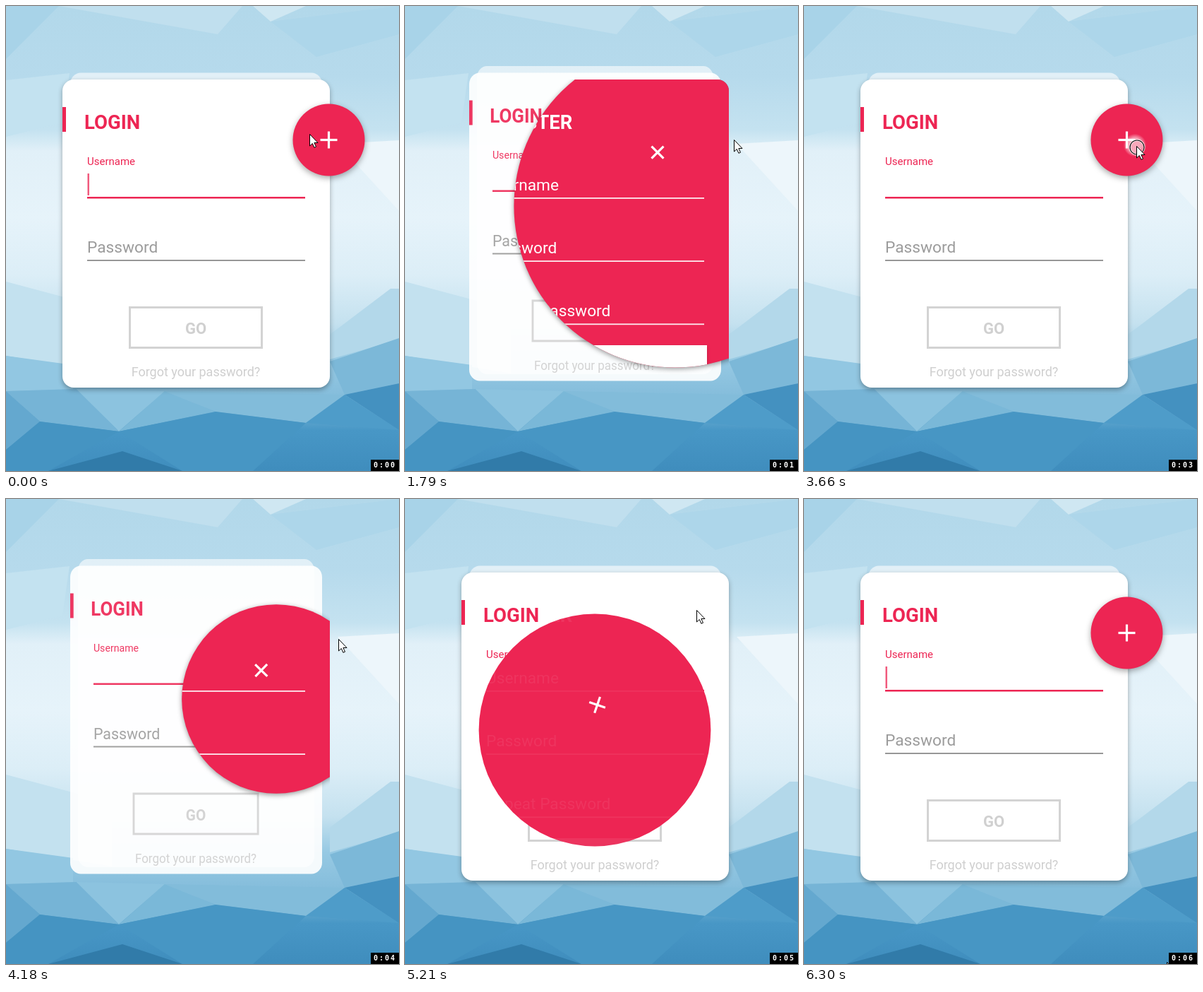
Recreate the animation shown at these times as an HTML page with a canvas. Size 557 by 658 pixels, loop 6.4 s.

```html
<!DOCTYPE html>
<html lang="en">
<head>
<meta charset="utf-8">
<title>Login and register</title>
<style>
html, body { margin: 0; width: 100%; height: 100%; overflow: hidden; background: #b2d8ea; }
canvas { display: block; width: 557px; height: 658px; }
</style>
</head>
<body>
<canvas id="stage" width="557" height="658"></canvas>
<script>
const W = 557, H = 658, LOOP = 6400;
const RED = '#ed2553';
const OPENS = [1290, 3770], CLOSES = [2604, 4899];
const MOVE = 250, REVEAL = 500, SHRINK = 600, BACK = 145;
const FAB = [457.5, 189.5], FAB_R = 51;
const SPOT = [383, 283], MID = [269, 327], CROSS = [408.5, 172.5];
const CARD = { x: 80, y: 104, w: 379, r: 16 };

const canvas = document.getElementById('stage');
const ctx = canvas.getContext('2d');

const clamp = v => Math.min(1, Math.max(0, v));
const lerp = (a, b, p) => a + (b - a) * p;
const ease = p => (1 - Math.cos(Math.PI * clamp(p))) / 2;
const decel = p => 1 - (1 - clamp(p)) ** 2;
const quad = (a, b, c, p) =>
  [0, 1].map(i => (1 - p) ** 2 * a[i] + 2 * p * (1 - p) * b[i] + p * p * c[i]);

// Low-poly backdrop
const FACETS = [
  ['#c3e1ef', 0, 390, 150, 430, 150, 520, 0, 495],
  ['#92c7e2', 0, 495, 95, 508, 95, 542, 0, 545],
  ['#b3d8ea', 545, 400, 557, 400, 557, 472, 459, 500, 459, 465],
  ['#7cb8d8', 459, 503, 557, 470, 557, 534, 480, 550],
  ['#76b4d6', 0, 545, 100, 542, 160, 602, 48, 588],
  ['#8cc3df', 100, 542, 225, 545, 160, 602],
  ['#7ab8d8', 225, 545, 297, 574, 160, 602],
  ['#82bcda', 225, 545, 480, 550, 425, 590, 297, 574],
  ['#64a8cf', 0, 545, 48, 588, 0, 628],
  ['#4594c2', 0, 628, 48, 588, 160, 602, 60, 658, 0, 658],
  ['#317ba9', 60, 658, 165, 630, 250, 658],
  ['#4796c4', 160, 602, 297, 574, 425, 590, 350, 658, 250, 658],
  ['#4491c0', 480, 550, 557, 534, 557, 600],
  ['#4e9cc9', 425, 590, 480, 550, 557, 600],
  ['#a8d3e8', 0, 0, 75, 0, 0, 75],
  ['#c0dfee', 75, 0, 335, 0, 300, 40],
  ['#cfe7f2', 350, 0, 425, 0, 375, 22],
  ['#add6ea', 375, 22, 557, 0, 557, 40, 440, 72],
  ['#c3e2f0', 0, 105, 90, 95, 80, 165, 0, 185],
  ['#edf6fb', 470, 195, 557, 190, 557, 290]
];
const SKY = [
  [0, '#b2d8ea'], [100, '#b6daec'], [175, '#c4e2f0'], [205, '#e1f0f8'], [300, '#e6f3fa'],
  [380, '#dceef7'], [450, '#c4e1ef'], [500, '#96c9e3'], [560, '#82bbda'], [600, '#4897c6'], [658, '#3f8dbd']
];

function makeBackdrop() {
  const layer = document.createElement('canvas');
  layer.width = W;
  layer.height = H;
  const g = layer.getContext('2d');
  const sky = g.createLinearGradient(0, 0, 0, H);
  SKY.forEach(([y, color]) => sky.addColorStop(y / H, color));
  g.fillStyle = sky;
  g.fillRect(0, 0, W, H);
  for (const [color, ...pts] of FACETS) {
    g.beginPath();
    for (let i = 0; i < pts.length; i += 2) g.lineTo(pts[i], pts[i + 1]);
    g.fillStyle = color;
    g.fill();
  }
  return layer;
}
const backdrop = makeBackdrop();

function shadow(alpha, blur, dy) {
  ctx.shadowColor = `rgba(0,0,0,${alpha})`;
  ctx.shadowBlur = blur;
  ctx.shadowOffsetY = dy;
}

function noShadow() {
  ctx.shadowColor = 'transparent';
}

function rect(x, y, w, h, color) {
  ctx.fillStyle = color;
  ctx.fillRect(x, y, w, h);
}

function disc([x, y], r, color) {
  ctx.beginPath();
  ctx.arc(x, y, r, 0, 2 * Math.PI);
  ctx.fillStyle = color;
  ctx.fill();
}

function cardPath(h) {
  ctx.beginPath();
  ctx.roundRect(CARD.x, CARD.y, CARD.w, h, CARD.r);
}

function text(str, x, y, size, color, weight = 400, align = 'left') {
  ctx.font = `${weight} ${size}px Roboto, sans-serif`;
  ctx.textAlign = align;
  ctx.fillStyle = color;
  ctx.fillText(str, x, y);
}

// One step back in the stack narrows a card and lifts it.
function pushBack(steps) {
  const cx = 269.5;
  ctx.translate(cx, -9.5 * steps);
  ctx.scale(1 - 0.058 * steps, 1);
  ctx.translate(-cx, 0);
}

function drawLogin(k, caret) {
  ctx.save();
  pushBack(1 + k);
  cardPath(436);
  ctx.fillStyle = 'rgba(255,255,255,0.6)';
  ctx.fill();
  ctx.restore();

  ctx.save();
  pushBack(k);
  ctx.globalAlpha = 1 - 0.09 * k;
  shadow(0.32 * (1 - k), 7, 3);
  cardPath(436);
  ctx.fillStyle = '#fff';
  ctx.fill();
  noShadow();
  rect(80, 143, 5, 35, RED);
  text('LOGIN', 111, 174, 27.5, RED, 700);
  text('Username', 115, 225, 15, RED);
  rect(115, 270, 309, 2.5, RED);
  if (caret) rect(115.5, 237, 2.5, 31, 'rgba(237,37,83,0.75)');
  text('Password', 115, 349, 22.7, '#9c9c9c');
  rect(115, 359, 309, 2, '#979797');
  ctx.strokeStyle = '#d3d3d3';
  ctx.lineWidth = 3;
  ctx.strokeRect(175.5, 426.5, 187, 57);
  text('GO', 269, 464, 22, '#d0d0d0', 700, 'center');
  text('Forgot your password?', 269, 524, 18, '#cfcfcf', 400, 'center');
  ctx.restore();
}

function drawForm(alpha) {
  ctx.save();
  ctx.globalAlpha = alpha;
  rect(80, 139, 5, 48, '#fff');
  text('REGISTER', 110.5, 174, 27.5, '#fff', 700);
  ['Username', 'Password', 'Repeat Password'].forEach((label, i) => {
    text(label, 115, 261 + 89 * i, 22.7, '#fff');
    rect(115, 271 + 89.2 * i, 309, 1.8, 'rgba(255,255,255,0.9)');
  });
  shadow(0.25, 4, 2);
  rect(111, 480, 317, 60, '#fff');
  noShadow();
  text('NEXT', 269, 519, 22, RED, 500, 'center');
  ctx.restore();
}

function drawIcon([x, y], degrees) {
  ctx.save();
  ctx.translate(x, y);
  ctx.rotate(degrees * Math.PI / 180);
  rect(-12, -1.6, 24, 3.2, '#fff');
  rect(-1.6, -12, 3.2, 24, '#fff');
  ctx.restore();
}

function drawFab(at, degrees) {
  ctx.save();
  shadow(0.35, 8, 3);
  disc(at, FAB_R, RED);
  ctx.restore();
  drawIcon(at, degrees);
}

// Register card seen through a growing or shrinking circle
function drawReveal(at, r, alpha, depth) {
  ctx.save();
  cardPath(446);
  ctx.clip();
  ctx.save();
  shadow(depth, 7, 2);
  disc(at, r, RED);
  ctx.restore();
  ctx.beginPath();
  ctx.arc(at[0], at[1], r, 0, 2 * Math.PI);
  ctx.clip();
  drawForm(alpha);
  ctx.restore();
}

function drawOpen() {
  ctx.save();
  shadow(0.35, 7, 3);
  cardPath(446);
  ctx.fillStyle = RED;
  ctx.fill();
  ctx.restore();
  drawForm(1);
  drawIcon(CROSS, 45);
}

function drawOpening(e) {
  const turn = 45 * ease(e / 450);
  if (e < MOVE) {
    drawFab(quad(FAB, [440, 265], SPOT, ease(e / MOVE)), turn);
    return;
  }
  const p = ease((e - MOVE) / REVEAL);
  if (p >= 1) {
    drawOpen();
    return;
  }
  drawReveal(SPOT, lerp(FAB_R, 404, p), clamp((e - MOVE) / 150), 0.4);
  drawIcon(quad(SPOT, [320, 187], CROSS, p), turn);
}

function drawClosing(e) {
  if (e < SHRINK) {
    drawReveal(MID, lerp(293, FAB_R, ease(e / SHRINK)), Math.exp(-e / 117), 0);
    drawIcon(quad(CROSS, [266, 222], MID, decel(e / 540)), 45 * (1 - clamp(e / 540)));
  } else {
    drawFab(quad(MID, [403, 307], FAB, ease((e - SHRINK) / BACK)), 0);
  }
}

function drawRipples(t) {
  for (const start of OPENS) {
    const e = t - start + 150;
    if (e < 0 || e > 300) continue;
    const r = 13 + e * 0.08;
    const glow = ctx.createRadialGradient(469, 197, r * 0.6, 469, 197, r);
    glow.addColorStop(0, `rgba(255,255,255,${0.7 * (1 - e / 300)})`);
    glow.addColorStop(1, 'rgba(255,255,255,0)');
    ctx.save();
    ctx.beginPath();
    ctx.arc(FAB[0], FAB[1], FAB_R, 0, 2 * Math.PI);
    ctx.clip();
    disc([469, 197], r, glow);
    ctx.restore();
  }
  for (const start of CLOSES) {
    const e = t - start;
    if (e > -60 && e < 290) disc([409, 173], 13, `rgba(255,255,255,${0.18 * clamp((290 - e) / 80)})`);
  }
}

const TRACK = [
  [60, 430, 181], [160, 466, 189], [2050, 466, 189], [2400, 411, 174], [3150, 411, 174],
  [3340, 471, 198], [4350, 471, 198], [4700, 413, 157], [5700, 413, 157],
  [6190, 510, 640], [6300, 514, 655]
];

function pointerAt(t) {
  const i = TRACK.findIndex(key => key[0] > t);
  if (i < 0) return TRACK[TRACK.length - 1].slice(1);
  if (i === 0) return TRACK[0].slice(1);
  const [t0, x0, y0] = TRACK[i - 1], [t1, x1, y1] = TRACK[i];
  const p = ease((t - t0) / (t1 - t0));
  return [lerp(x0, x1, p), lerp(y0, y1, p)];
}

const ARROW = [[0, 0], [0, 16.5], [3.8, 13], [6.4, 18.8], [9, 17.7], [6.4, 12], [11.5, 12]];

function drawPointer(t) {
  const [x, y] = pointerAt(t);
  const pressed = [...OPENS, ...CLOSES].some(s => t >= s - 140 && t < s + 30);
  ctx.save();
  ctx.translate(x + 0.5, y + 0.5);
  if (pressed) {
    ctx.beginPath();
    ctx.arc(0.5, 1.5, 10, 0, 2 * Math.PI);
    ctx.strokeStyle = 'rgba(255,255,255,0.7)';
    ctx.lineWidth = 3;
    ctx.stroke();
    ctx.strokeStyle = '#111';
    ctx.lineWidth = 1.2;
    ctx.stroke();
  }
  ctx.beginPath();
  ARROW.forEach(p => ctx.lineTo(...p));
  ctx.closePath();
  ctx.fillStyle = '#fff';
  ctx.fill();
  ctx.strokeStyle = '#000';
  ctx.lineWidth = 1;
  ctx.stroke();
  ctx.restore();
}

function drawClock(t) {
  rect(517, 642, 40, 16, '#000');
  ctx.save();
  ctx.font = 'bold 10px "DejaVu Sans Mono", monospace';
  ctx.letterSpacing = '2px';
  ctx.textAlign = 'left';
  ctx.fillStyle = '#fff';
  ctx.fillText('0:0' + Math.floor((t + 20) / 1000), 521, 653);
  ctx.restore();
}

function caretOn(t) {
  return t < 490 || (t >= 3200 && t < 3500) || (t >= 5220 && t < 5720) || t >= 6220;
}

function draw(t) {
  const last = list => Math.max(-1, ...list.filter(s => s <= t));
  const opened = last(OPENS), closed = last(CLOSES);
  const opening = opened > closed;
  const e = t - Math.max(opened, closed);

  let k = 0;
  if (opening) k = ease((e - 150) / 260);
  else if (closed > 0) k = 1 - ease(e / 180);

  ctx.drawImage(backdrop, 0, 0);
  drawLogin(k, caretOn(t));
  if (opening) drawOpening(e);
  else if (closed > 0) drawClosing(e);
  else drawFab(FAB, 0);
  drawRipples(t);
  drawPointer(t);
  drawClock(t);
}

const begin = performance.now();
function tick() {
  draw((performance.now() - begin) % LOOP);
  requestAnimationFrame(tick);
}
tick();
</script>
</body>
</html>
```
